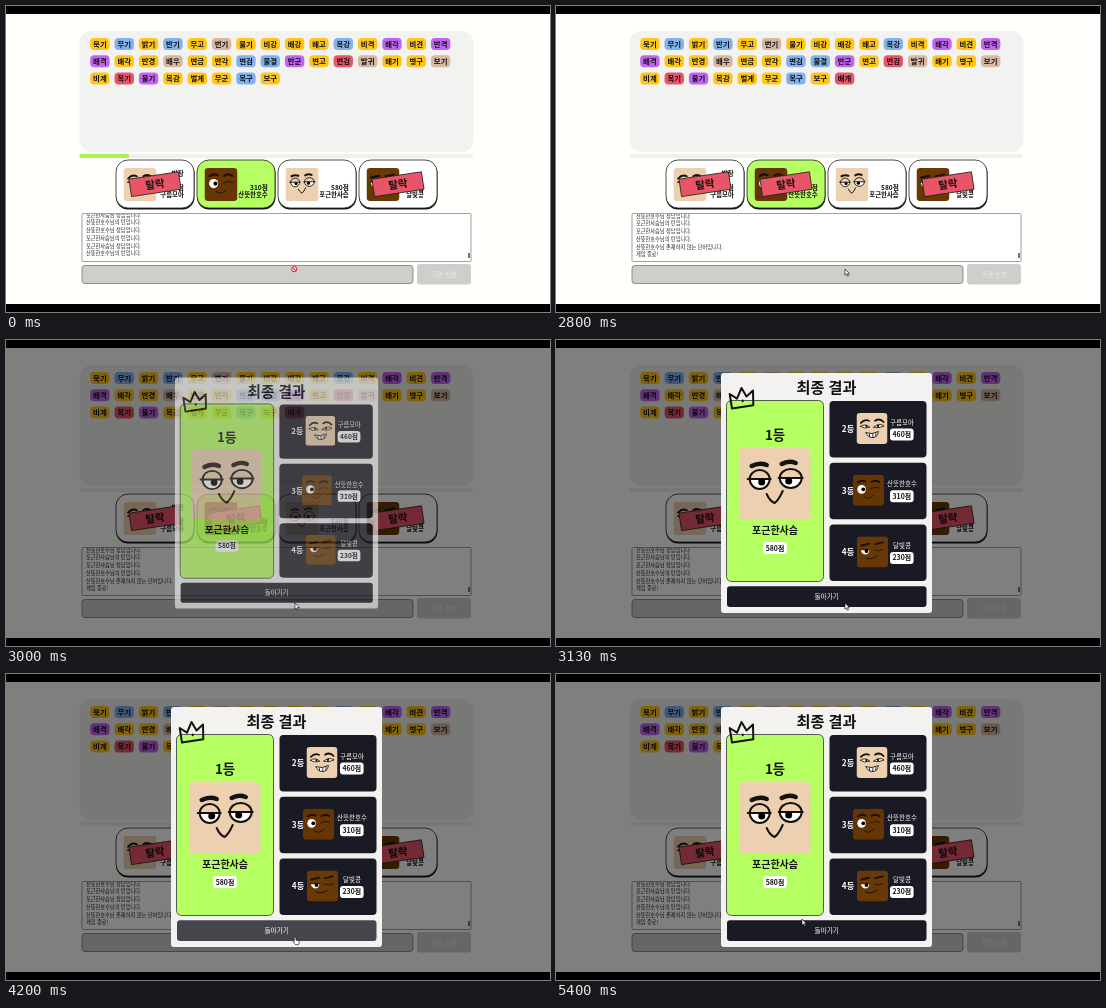
Recreate the animation shown at these times as an HTML page. Size 544 px wide and 306 px high, loop 5.59 s.

```html
<!DOCTYPE html>
<html lang="ko">
<head>
<meta charset="utf-8">
<title>단어 게임</title>
<style>
html, body { margin: 0; width: 100%; height: 100%; overflow: hidden; background: #000; }
svg { display: block; width: 100vw; height: 100vh; }
text { font-family: "Noto Sans CJK KR", "Noto Sans CJK", sans-serif; white-space: pre; }
.ink { fill: none; stroke: #15110f; stroke-width: 2; stroke-linecap: round; stroke-linejoin: round; }
</style>
</head>
<body>
<svg viewBox="0 0 544 306">
  <defs>
    <clipPath id="chatClip"><rect x="77" y="208" width="387" height="47"/></clipPath>
    <symbol id="calm" viewBox="0 0 72 72">
      <rect width="72" height="72" rx="5" fill="#edd0b0"/>
      <path d="M11 31a10 10 0 0 0 20 0zM41 30a11 10 0 0 0 22 0z" fill="#fff"/>
      <path class="ink" d="M9 31H32M11 31a10 10 0 0 0 20 0M11 31a10 9 0 0 1 20 0M40 30H64M41 30a11 10 0 0 0 22 0M41 30a11 9 0 0 1 22 0M28 46Q31 53 36 55Q40 52 44 43"/>
      <path class="ink" d="M13 18Q21 14 28 17M43 16Q50 12 57 15" style="stroke-width:4.5"/>
      <circle cx="23" cy="34" r="3.5"/><circle cx="50" cy="33" r="3.5"/>
    </symbol>
    <symbol id="pain" viewBox="0 0 72 72">
      <rect width="72" height="72" rx="8" fill="#edd0b0"/>
      <path d="M9 31Q20 23 31 33Q18 38 9 31M40 33Q52 22 64 30Q53 37 40 33M22 46Q36 51 51 43Q48 58 36 57Q26 56 22 46" fill="#fff"/>
      <path class="ink" d="M9 31Q20 23 31 33Q18 38 9 31M40 33Q52 22 64 30Q53 37 40 33M22 46Q36 51 51 43Q48 58 36 57Q26 56 22 46M30 49V55M38 49V57M45 47V54"/>
      <path class="ink" d="M10 23Q19 13 29 18M43 18Q54 11 63 21" style="stroke-width:4"/>
      <circle cx="23" cy="31" r="2.5"/><circle cx="50" cy="30" r="2.5"/>
    </symbol>
    <symbol id="wink" viewBox="0 0 72 72">
      <rect width="72" height="72" rx="8" fill="#653604"/>
      <circle cx="20" cy="34" r="10" fill="#fff"/><circle cx="24" cy="34" r="4.5"/>
      <path class="ink" d="M41 33Q51 26 62 31M25 51Q35 60 48 48"/>
      <path class="ink" d="M11 18Q20 11 29 16M43 17Q51 11 61 17" style="stroke-width:4.5"/>
    </symbol>
    <symbol id="smirk" viewBox="0 0 72 72">
      <rect width="72" height="72" rx="8" fill="#683905"/>
      <path d="M9 31H29Q28 42 19 42Q10 41 9 31" fill="#fff"/><circle cx="22" cy="34" r="4.5"/>
      <path class="ink" d="M8 31H30M41 32Q50 36 60 31M20 50Q32 56 47 46"/>
      <path class="ink" d="M10 21L28 17M42 18L60 14" style="stroke-width:4.5"/>
    </symbol>
  </defs>
  <g id="board"></g>
  <rect id="shade" width="544" height="306" opacity="0"/>
  <g id="modal"></g>
  <g id="ban" fill="none" stroke="#d3202f" stroke-width="1"><circle cx="288.3" cy="263.2" r="2.6" fill="#f3d5d5"/><path d="M286.5 261.4l3.6 3.6"/></g>
  <path id="arrow" d="M0 0V6.2L1.5 4.9L2.5 7.2L3.5 6.8L2.5 4.6H4.4Z" fill="#fff" stroke="#000" stroke-width=".6"/>
  <path id="hand" d="M1 0Q1.9 0 1.9 .9V3L4.8 3.7Q5.5 4 5.3 5L4.6 7.6H1.3L-.8 4.9Q-.5 4 .2 4.6V.9Q.2 0 1 0Z" fill="#fff" stroke="#000" stroke-width=".6"/>
  <path d="M0 0H544V8H0ZM0 298H544V306H0Z"/>
</svg>
<script>
const LOOP = 5590;
const $ = id => document.getElementById(id);
const names = { host: '구름모아', turn: '산뜻한호수', winner: '포근한사슴', last: '달빛콩' };
const DARK = '#1a1a24', LIME = '#b5ff62', RED = '#ea5468';

const rect = (x, y, w, h, r, fill, extra = '') =>
  `<rect x="${x}" y="${y}" width="${w}" height="${h}" rx="${r}" fill="${fill}" ${extra}/>`;
// y is the vertical middle of the glyphs
const text = (s, x, y, size, weight = 900, fill = '#111', anchor = 'middle') =>
  `<text x="${x}" y="${y + size * 0.37}" font-size="${size}" font-weight="${weight}" fill="${fill}" text-anchor="${anchor}">${s}</text>`;
const face = (id, x, y, size) => `<use href="#${id}" x="${x}" y="${y}" width="${size}" height="${size}"/>`;

const chipColors = { Y: '#ffc619', B: '#80b3ee', P: '#c264f2', T: '#d8b8a2', R: RED };
const chipRows = [
  ['묵기 부기 밝기 반기 부고 번기 물기 비강 배강 배고 복강 비격 배각 비견 반격', 'YBYBYTYYYYBYPYP'],
  ['배격 배각 반경 배우 변금 반각 변검 물결 반군 변고 번검 발귀 배기 병구 보기', 'PYYTYYBBPYRTYYT'],
  ['비계 복기 불기 복감 벌게 부군 복구 보구 배개', 'YRPYYYBYR']
];
const chips = chipRows.map(([words, colors], row) => words.split(' ').map((word, i) => {
  const x = 84.2 + i * 24.34, y = 32 + row * 17.2;
  return `<g class="chip">${rect(x, y, 19.4, 12, 4, chipColors[colors[i]])}${text(word, x + 9.7, y + 6, 7.4)}</g>`;
}).join('')).join('');

function playerCard(i, id, name, score, isHost) {
  const x = 110 + i * 81, right = x + 56 + name.length * 2.95;
  return rect(x, 155, 78.5, 48.5, 12, '#111') +
    rect(x, 154, 78, 48, 12, i === 1 ? LIME : '#fff', 'stroke="#222" stroke-width=".8"') +
    face(id, x + 7.5, 162, 33) +
    (isHost ? text('방장', right, 168, 6.5, 900, '#111', 'end') : '') +
    text(score + '점', right, 181.5, 6.6, 900, '#111', 'end') +
    text(name, right, 188.3, 6.4, 900, '#111', 'end') +
    (i === 2 ? '' : `<g class="stamp" transform="translate(${x + 39} 178.2) rotate(-8.5)">` +
      rect(-25, -8.8, 50, 17.6, 0, RED, 'stroke="#222" stroke-width=".8"') + text('탈락', 0, 0, 10.5) + '</g>');
}

$('board').innerHTML =
  rect(0, 0, 544, 306, 0, '#fffffc') + rect(73.5, 25, 394, 121, 12, '#f2f2f0') + chips +
  rect(73.5, 148, 393.5, 4, 2, '#f0f0ee') + rect(73.5, 148, 49.5, 4, 1, '#a9f455', 'id="timer"') +
  playerCard(0, 'pain', names.host, 460, true) + playerCard(1, 'wink', names.turn, 310) +
  playerCard(2, 'calm', names.winner, 580) + playerCard(3, 'smirk', names.last, 230) +
  rect(76, 207.5, 389, 48, 1, '#fff', 'stroke="#777" stroke-width=".7"') +
  '<g id="chat" clip-path="url(#chatClip)"></g>' + rect(462, 247, 2, 5, 0, '#777') +
  rect(76, 259.5, 331, 18, 3, '#cececb', 'stroke="#777" stroke-width=".8"') +
  rect(411, 258, 54, 20.5, 3, '#cececc') + text('기권 신청', 438, 268.3, 6.6, 400, '#eee');

const turn = who => who + '님의 턴입니다.', right = who => who + '님 정답입니다.';
const chatLog = [
  right(names.winner), turn(names.turn), right(names.turn), turn(names.winner), right(names.winner),
  turn(names.turn), names.turn + '님 존재하지 않는 단어입니다.', '게임 종료!'
];
const chatViews = [6, 7, 8].map(end => chatLog.slice(end - 6, end).map((line, i) =>
  text(line, 80, (end === 8 ? 209.6 : 208.6) + i * 7.75, 5.2, 400, '#222', 'start')).join(''));

const pill = (s, x, y) => rect(x - 11.8, y - 6, 23.6, 12, 3, '#fff') + text(s + '점', x, y, 6.9);
function rankCard(i, id, name, score) {
  const y = 61 + i * 61.7;
  return rect(273.5, y, 97, 56.5, 4, DARK) + text(i + 2 + '등', 292, y + 28, 8.2, 900, '#fff') +
    face(id, i ? 297 + i * .0 + (i === 2 ? 4 : 0) : 300.5, y + 12, 31) +
    text(name, 346, y + 21.3, 6.5, 400, '#fff') + pill(score, 345.8, y + 33.5);
}
$('modal').innerHTML =
  rect(165, 33, 211, 240, 3, '#f3f2f1') + text('최종 결과', 270.5, 47.5, 15.2) +
  rect(170.5, 60.5, 97, 181, 5, LIME, 'stroke="#333" stroke-width=".8"') +
  text('1등', 219, 95, 13.4) + face('calm', 182.7, 108, 72) +
  text(names.winner, 219, 190.5, 10) + pill(580, 219, 208) +
  '<path class="ink" d="M176 68.5L173.7 54L181 58.7L185.5 48L190.5 56.5L197 50.5L197.3 65.2ZM186.7 60.5v.8"/>' +
  rankCard(0, 'pain', names.host, 460) + rankCard(1, 'wink', names.turn, 310) + rankCard(2, 'smirk', names.last, 230) +
  rect(171, 246.2, 199.5, 20.8, 3, DARK, 'id="back"') + text('돌아가기', 270.7, 256.8, 6.7, 400, '#fff');

const stamp = document.querySelectorAll('.stamp')[1];
const lastChip = [...document.querySelectorAll('.chip')].pop();
const show = (el, on) => el.setAttribute('visibility', on ? 'visible' : 'hidden');
const ramp = (t, from, to) => Math.min(1, Math.max(0, (t - from) / (to - from)));
const mix = (a, b, p) => a + (b - a) * p;
// The picture holds for 130 ms, then 70 ms, alternately.
const hold = t => Math.floor(t / 200) * 200 + (t % 200 >= 130 ? 130 : 0);
let chatView = -1;

function draw(time) {
  const t = hold(time), over = t >= 2800;
  $('timer').setAttribute('width', mix(49.5, 0, ramp(t, 0, 960)));
  show(lastChip, t >= 930);
  show(stamp, over);
  const view = over ? 2 : t >= 930 ? 1 : 0;
  if (view !== chatView) $('chat').innerHTML = chatViews[chatView = view];

  $('shade').setAttribute('opacity', t >= 2930 ? .5 : 0);
  const open = ramp(t, 2880, 3070), scale = mix(.9, 1, open);
  $('modal').setAttribute('opacity', open);
  $('modal').setAttribute('transform', `translate(270.5 153) scale(${scale}) translate(-270.5 -153)`);

  const hover = ramp(t, 3960, 4170) - ramp(t, 5150, 5350);
  $('back').setAttribute('fill', `rgb(${[26, 26, 36].map((c, i) => Math.round(mix(c, [69, 69, 78][i], hover)))})`);
  const p = ramp(t, 4870, 5330), move = p * p * (3 - 2 * p);
  const pointing = t >= 4000 && t < 5200;
  const at = `translate(${mix(t < 4000 ? 289 : 288, 246, move)} ${mix(263, 245, move)})`;
  for (const id of ['arrow', 'hand']) $(id).setAttribute('transform', at);
  show($('ban'), !over);
  show($('arrow'), over && !pointing);
  show($('hand'), pointing);
}

const start = performance.now();
function tick() {
  draw((performance.now() - start) % LOOP);
  requestAnimationFrame(tick);
}
tick();
</script>
</body>
</html>
```
